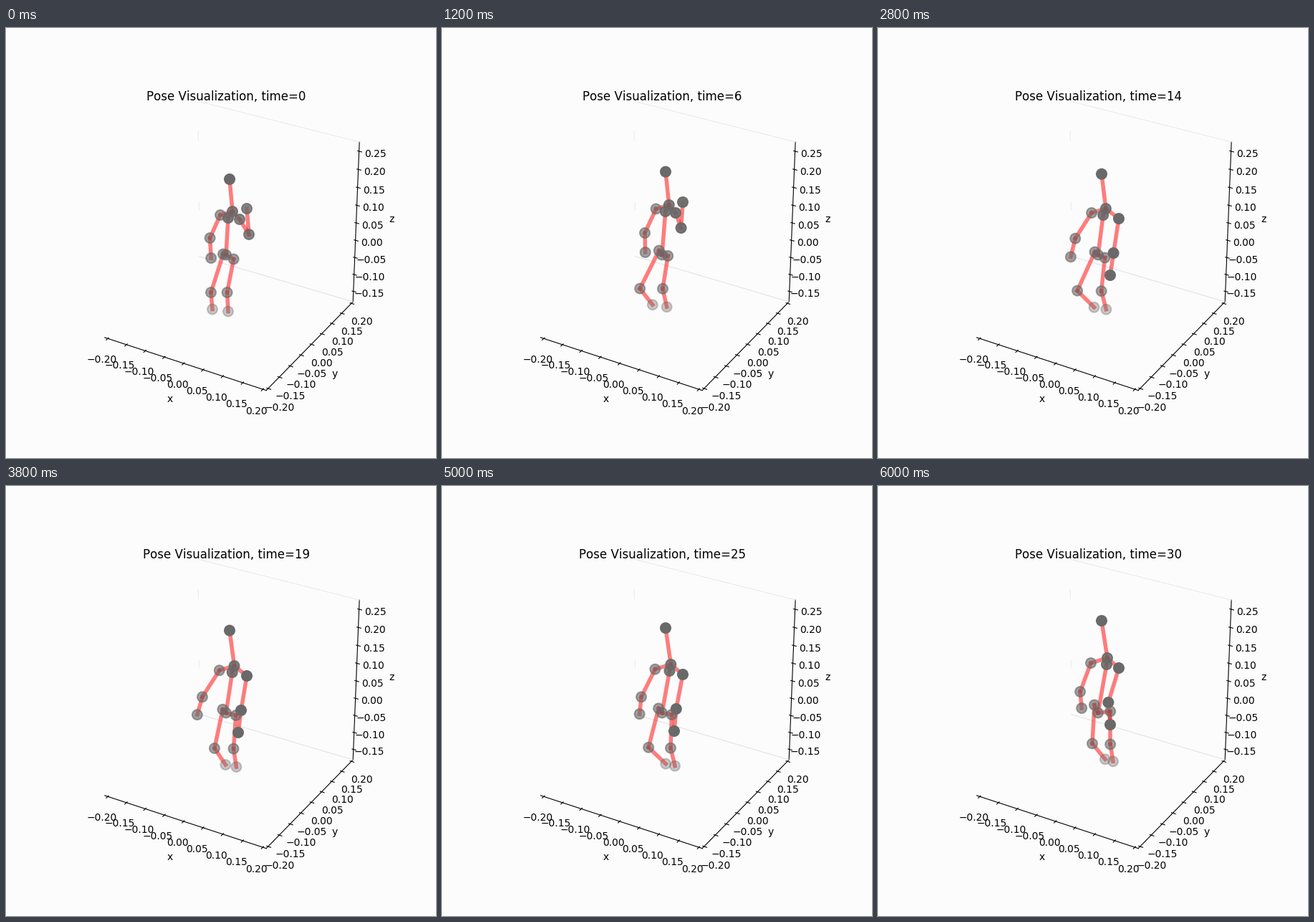
A matplotlib script for the animation above (6.2 s loop, 600x600 px).

```python
import numpy as np
import matplotlib.pyplot as plt
from matplotlib.animation import FuncAnimation
from matplotlib.collections import LineCollection
from matplotlib.colors import to_rgba

STEPS, INTERVAL = 31, 200
BG = "#fcfcfc"
plt.rcParams["font.family"] = "DejaVu Sans"
plt.rcParams["text.kerning_factor"] = 6

fig = plt.figure(figsize=(6, 6), dpi=100, facecolor=BG)

# Empty 3D box: a cube with only its axes and two faint back edges
box = fig.add_subplot(projection="3d", facecolor=BG)
box.set_box_aspect((1, 1, 1), zoom=0.94675)
box.view_init(elev=30, azim=-60)
box.grid(False)
SIDE, LOW, HIGH = 0.2 * 25 / 24, -0.181, 0.2753


def back_edge(x, z, color):
    box.plot(x, [SIDE, SIDE], z, color=color, lw=0.8)


back_edge([-SIDE, SIDE], [HIGH, HIGH], "#ebebeb")
back_edge([-SIDE, SIDE], [LOW, LOW], "#e4e4e4")
for top, bottom in [(0.815, 0.755), (0.36, 0.31)]:
    span = LOW + (HIGH - LOW) * np.array([top, bottom])
    back_edge([-SIDE, -SIDE], span, "#ebebeb")

ticks = 0.05 * np.arange(-4, 5)
box.set(xticks=ticks, yticks=ticks, zticks=ticks + 0.05,
        xlabel="x", ylabel="y", zlabel="z")
box.set(xlim=(-SIDE, SIDE), ylim=(-SIDE, SIDE), zlim=(LOW, HIGH))
for axis in (box.xaxis, box.yaxis, box.zaxis):
    axis.pane.set_visible(False)

# The figure is drawn over the box in pixels, y down
ax = fig.add_axes([0, 0, 1, 1])
ax.set(xlim=(0, 600), ylim=(600, 0))
ax.axis("off")
title = ax.text(307.5, 101, "", size=12, ha="center", va="baseline")

# Limbs: spine (chest, neck, head), left and right arm, left and right leg
PELVIS = [(307, 316.5)]
START = np.array([
    [(310, 260), (316, 251), (312, 206)],
    [(299, 256), (280, 288), (277, 316)],
    [(326, 262), (336, 283), (336, 247)],
    [(303, 313), (284, 366), (288, 389)],
    [(317, 320), (308, 366), (310, 392)]], float)
END = np.array([
    [(319, 260), (320, 251), (312, 199)],
    [(297, 258), (278, 298), (276, 321)],
    [(336, 265), (328, 313), (324, 344)],
    [(302, 311), (295, 366), (317, 389)],
    [(323, 320), (323, 367), (328, 392)]], float)
SPINE, ARM_L, ARM_R, LEG_L, LEG_R = range(5)

# Joint 0 is the pelvis; each limb hangs on the pelvis or the neck
NECK = 2
BONES = []
for limb, root in enumerate([0, NECK, NECK, 0, 0]):
    j = 1 + 3 * limb
    BONES += [(root, j), (j, j + 1), (j + 1, j + 2)]

# Shared signals: body sinking (pixels) and leg stride
KEYS = [0, 6, 10, 14, 19, 25, 30]
SINK = [5, -4, 13, 1, 0, -2, -11]
STRIDE = [0.2, -1, 1.2, -1.1, 0, -0.5, 0.4]


def ease(u):
    return (1 - np.cos(np.pi * np.clip(u, 0, 1))) / 2


def signal(values, t):
    k = min(np.searchsorted(KEYS, t, side="right"), len(KEYS) - 1)
    u = ease((t - KEYS[k - 1]) / (KEYS[k] - KEYS[k - 1]))
    return values[k - 1] + (values[k] - values[k - 1]) * u


def pose(t):
    drift = np.full((5, 1, 1), t / (STEPS - 1))
    drift[ARM_R] = ease((t - 10) / 4)
    limbs = START + (END - START) * drift

    sink, stride = signal(SINK, t), signal(STRIDE, t)
    limbs[:LEG_L, :, 1] += sink
    limbs[LEG_L:, :, 1] += sink * np.array([0.5, 0.6, 0.7])

    swing = np.cos(2 * np.pi * (t - 2) / STEPS)
    limbs[ARM_L, 1:, 0] += swing * np.array([5, 10])
    limbs[ARM_R, 1, 0] += 0.6 * sink
    limbs[LEG_L, 1, 0] += 10 * stride
    limbs[LEG_R, :2, 0] += 3 * stride
    return np.vstack([PELVIS, limbs.reshape(-1, 2)])


def opacity(t):
    """Joints fade with distance from the viewer."""
    limbs = np.full((5, 3), 0.62)
    limbs[SPINE] = 0.88, 0.85, 1
    limbs[ARM_R] = 0.8 + 0.2 * ease(t / 10)
    limbs[LEG_L:] = 0.63, 0.6, 0.35
    return np.append(0.62, limbs)


bones = LineCollection([], colors=[to_rgba("red", 0.5)], linewidths=4,
                       capstyle="projecting", zorder=2)
ax.add_collection(bones)
joints = ax.scatter(np.zeros(16), np.zeros(16), s=100, linewidths=1.5, zorder=3)


def update(t):
    pts, alpha = pose(t), opacity(t)
    bones.set_segments(pts[np.array(BONES)])
    order = np.argsort(alpha, kind="stable")
    colors = np.tile(to_rgba("dimgray"), (len(pts), 1))
    colors[:, 3] = alpha[order]
    joints.set_offsets(pts[order])
    joints.set_facecolors(colors)
    joints.set_edgecolors(colors)
    title.set_text(f"Pose Visualization, time={t}")
    return bones, joints, title


anim = FuncAnimation(fig, update, frames=STEPS, interval=INTERVAL,
                     repeat=True, repeat_delay=0)
plt.show()
```
